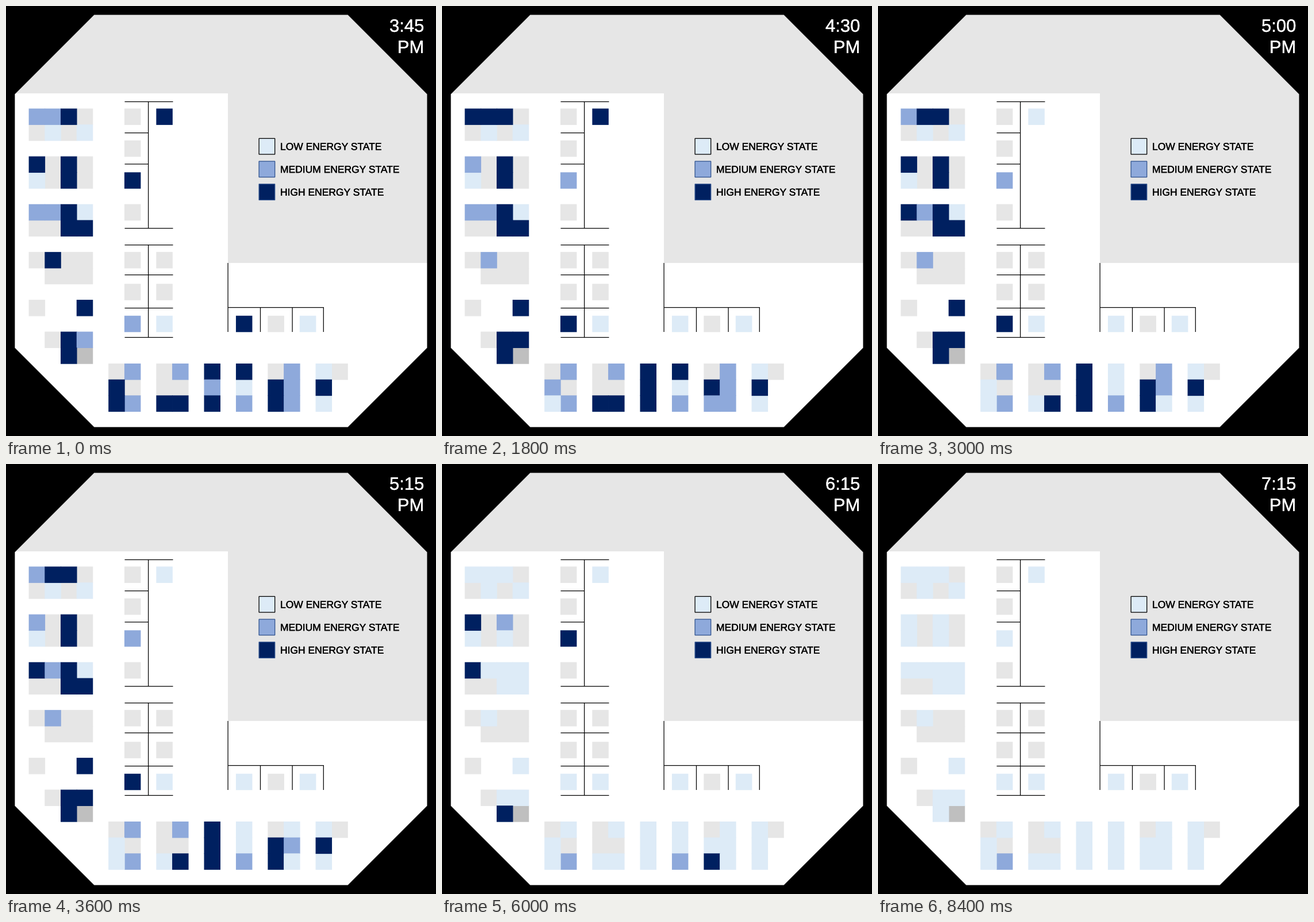
Animation of 748 by 748 pixels, one loop 9 s. Source, as a matplotlib script:

```python
import matplotlib.pyplot as plt
from matplotlib.animation import FuncAnimation
from matplotlib.patches import Polygon, Rectangle
from matplotlib.patheffects import withStroke

SIZE, DPI = 748, 100
PT = 72 / DPI
STEPS, STEP_MS = 15, 600
X0, Y0, PITCH, DESK = 39.6, 178.4, 27.72, 28.5
COLORS = {"L": "#ddebf7", "M": "#8ea9db", "H": "#002060",
          "g": "#e6e6e6", "d": "#bfbfbf"}

# Desks that never change: row, state, columns
STATIC = [
    (0, "g", (3, 6)), (1, "g", (0, 2)), (1, "L", (1, 3)), (2, "g", (6,)),
    (3, "g", (1, 3)), (4, "g", (1, 3)), (4, "L", (0,)),
    (6, "L", (3,)), (6, "g", (6,)), (7, "g", (0, 1)),
    (9, "g", (0, 2, 3, 6, 8)), (10, "g", (1, 2, 3)), (11, "g", (6, 8)),
    (12, "g", (0,)), (13, "L", (8, 17)), (13, "g", (15,)),
    (14, "g", (1,)), (15, "d", (3,)),
    (16, "g", (5, 8, 15, 19)), (16, "L", (18,)),
    (17, "g", (6, 8, 9)), (17, "L", (13,)),
    (18, "M", (6,)), (18, "L", (18,)),
]

# Desks that change: row -> {column: states, each with its first step}
ACTIVE = {
    0: {0: "M0 H2 M5 L8", 1: "M0 H1 L7", 2: "H0 L9", 8: "H0 L5"},
    3: {0: "H0 M3 H4 M6 L7 H9 L13", 2: "H0 M9 L11"},
    4: {2: "H0 L7", 6: "H0 M2 H7 L11"},
    6: {0: "M0 H5 L11", 1: "M0 L7", 2: "H0 L7"},
    7: {2: "H0 L7", 3: "H0 L8"},
    9: {1: "H0 M2 L7"},
    12: {3: "H0 L10"},
    13: {6: "M0 H2 L9", 13: "H0 L2"},
    14: {2: "H0 L7", 3: "M0 H1 L9"},
    15: {2: "H0 L11"},
    16: {6: "M0 L9", 9: "M0 L7", 11: "H0 L7", 13: "H0 L4", 16: "M0 L6"},
    17: {5: "H0 M2 L4", 11: "M0 H2 L9", 15: "H0 L9", 16: "M0 L7",
         18: "H0 L7"},
    18: {5: "H0 L2", 8: "H0 L4", 9: "H0 L9", 11: "H0 M7 L9", 13: "M0 L13",
         15: "H0 M2 H4 L11", 16: "M0 L4"},
}

plt.rcParams["text.hinting"] = "no_hinting"
fig = plt.figure(figsize=(SIZE / DPI, SIZE / DPI), dpi=DPI, facecolor="black")
ax = fig.add_axes([0, 0, 1, 1])
ax.set(xlim=(0, SIZE), ylim=(SIZE, 0))
ax.axis("off")


def box(x, y, w, h, color, edge="none", lw=0):
    return ax.add_patch(Rectangle((x, y), w, h, fc=color, ec=edge, lw=lw * PT,
                                  joinstyle="miter", snap=False))


def area(points, color):
    ax.add_patch(Polygon(points, fc=color, ec="none", snap=False))


def desk(col, row, state):
    return box(X0 + col * PITCH, Y0 + row * PITCH, DESK, DESK, COLORS[state])


def label(x, y, text, px, color, ha="left"):
    weight = withStroke(linewidth=0.35 * PT, foreground=color)
    return ax.text(x, y, text, fontsize=px * PT, color=color, ha=ha,
                   va="baseline", family="Liberation Sans",
                   path_effects=[weight])


def wall(x1, y1, x2, y2):
    ax.plot([x1, x2], [y1, y2], color="black", lw=1.25 * PT,
            solid_capstyle="butt", snap=False)


def state_at(plan, step):
    return [change[0] for change in plan.split() if int(change[1:]) <= step][-1]


# Floor plan: an octagon split into a grey and a white part
lo, hi, a, b = 15.4, 732.5, 153.4, 594.6
area([(lo + 1.4, 152), (a, lo), (b, lo), (hi, a), (hi, 447), (386, 447),
      (386, 152)], COLORS["g"])
area([(lo + 1.4, 152), (386, 152), (386, 447), (hi, 447), (hi, b), (b, hi),
      (a, hi), (lo, b), (lo, a)], "white")

for row, state, cols in STATIC:
    for col in cols:
        desk(col, row, state)
desks = [(desk(col, row, plan[0]), plan)
         for row, cols in ACTIVE.items() for col, plan in cols.items()]

for y in (166.5, 386.7, 415.7, 467.7, 525.5, 576.5):
    wall(206.5, y, 290.5, y)
for y in (220.7, 275):
    wall(206.5, y, 248, y)
wall(247.6, 166.5, 247.6, 386.7)
wall(247.6, 415.7, 247.6, 576.5)
wall(386.1, 447, 386.1, 567)
wall(386, 524.5, 553, 524.5)
for x in (442.5, 498.1, 552.3):
    wall(x, 524.5, x, 567)

# Legend
for i, (state, name, edge) in enumerate([("L", "LOW", "black"),
                                         ("M", "MEDIUM", "#2f528f"),
                                         ("H", "HIGH", "#2f528f")]):
    y = 230.4 + 39.7 * i
    box(440.1, y, 27.6, 27.6, COLORS[state], edge, 1.3)
    label(477, y + 20, f"{name} ENERGY STATE", 17.45, "black")

clock = label(727.3, 44.8, "", 31, "white", "right")
label(727.3, 81.8, "PM", 31, "white", "right")


def update(step):
    hour, minute = divmod(3 * 60 + 45 + 15 * step, 60)
    clock.set_text(f"{hour}:{minute:02d}")
    for patch, plan in desks:
        patch.set_facecolor(COLORS[state_at(plan, step)])
    return [clock] + [patch for patch, _ in desks]


anim = FuncAnimation(fig, update, frames=STEPS, interval=STEP_MS,
                     repeat=True, repeat_delay=0)
plt.show()
```
